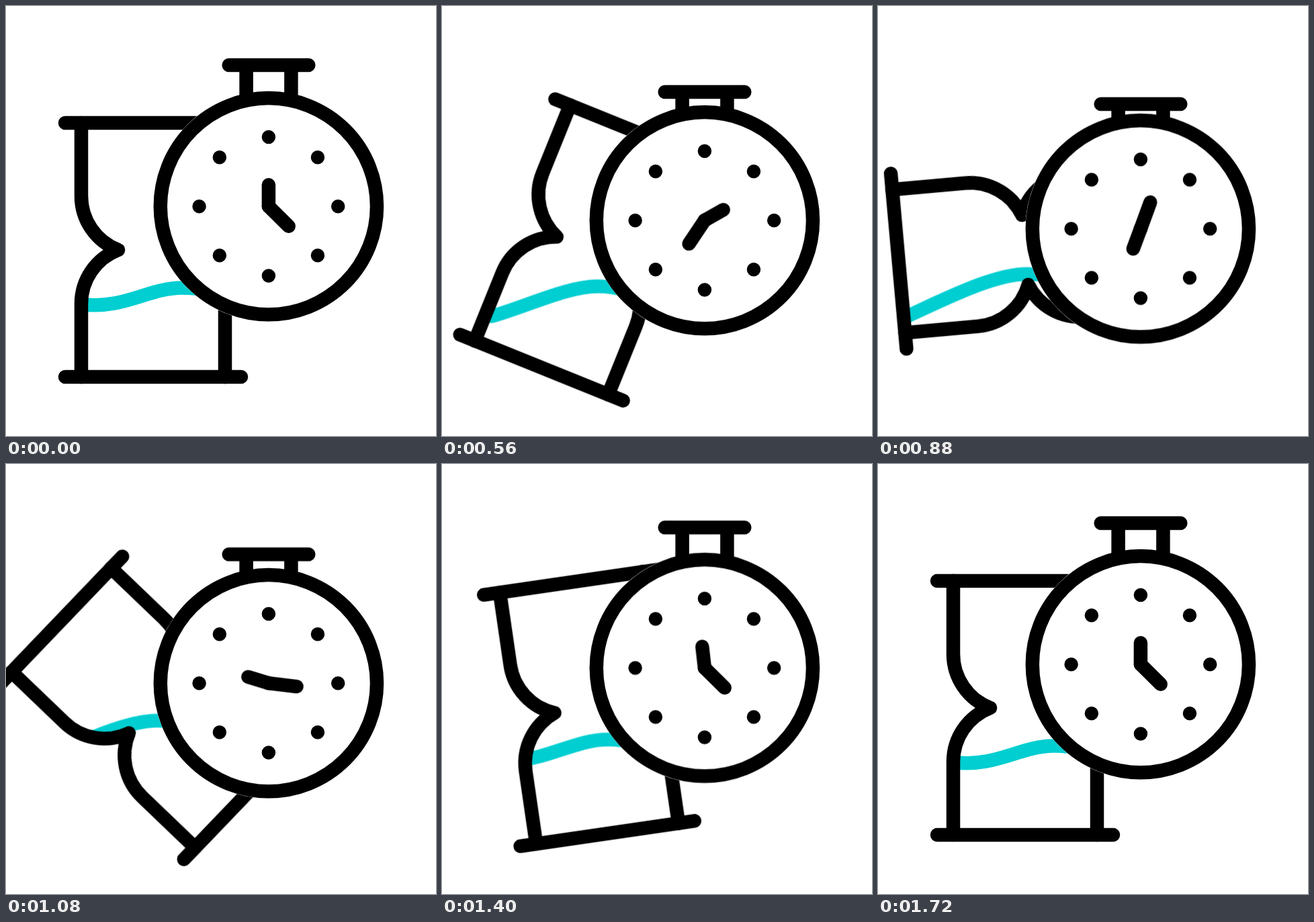
Write an HTML page that moves like this. It is 640 by 640 pixels and loops after 2000 ms.

```html
<!DOCTYPE html>
<html lang="en">
<head>
<meta charset="utf-8">
<title>Hourglass and stopwatch</title>
<style>
  html, body { margin: 0; width: 100%; height: 100%; overflow: hidden; background: #fff; }
  svg {
    display: block; width: 100%; height: 100%;
    fill: none; stroke: #000; stroke-width: 20.5; stroke-linecap: round; stroke-linejoin: round;
  }

  .spin, .level, .rise, .wave, .dial, .crown, .hour, .minute {
    animation: 2s cubic-bezier(.5, 0, .5, 1) infinite;
  }

  /* hourglass half turn; the liquid is turned back to stay level */
  .spin, .level { transform-origin: 219px 363px; animation-timing-function: cubic-bezier(.593, 0, .407, 1); }
  .spin { animation-name: spin; }
  .level { animation-name: level; }
  @keyframes spin { 0%, 4% { transform: rotate(0deg); } 86%, 100% { transform: rotate(180deg); } }
  @keyframes level { 0%, 4% { transform: rotate(0deg); } 86%, 100% { transform: rotate(-180deg); } }

  .rise { animation-name: rise; animation-timing-function: linear; }
  @keyframes rise {
    0%, 4% { transform: translateY(0); }
    18% { transform: translateY(-.5px); animation-timing-function: cubic-bezier(.5, .05, .75, .3); }
    36% { transform: translateY(-8.5px); }
    44% { transform: translateY(-20.5px); animation-timing-function: cubic-bezier(.4, .4, .7, 1); }
    54% { transform: translateY(-37.5px); animation-timing-function: cubic-bezier(.45, 0, .7, .6); }
    70% { transform: translateY(-9.5px); animation-timing-function: cubic-bezier(.3, .75, .6, 1); }
    82%, 100% { transform: translateY(0); }
  }

  .wave { animation-name: wave; animation-timing-function: linear; }
  @keyframes wave {
    0%, 4% {
      d: path("M112 444 C175 452 212 419.5 262 419.5 S335 440 362 447");
      animation-timing-function: cubic-bezier(.4, 0, .7, .5);
    }
    18% { d: path("M105 449.5 C150 447.5 205 419.5 248 419.5 S321 440 348 447"); }
    36% {
      d: path("M50 475.5 C110 449.5 172 419.5 219 419.5 S292 440 319 447");
      animation-timing-function: cubic-bezier(.3, .45, .6, 1);
    }
    44% { d: path("M30 488.5 C95 459.5 170 419.5 222 419.5 S295 440 322 447"); }
    54% {
      d: path("M30 488.5 C95 459.5 173 419.5 225 419.5 S298 440 325 447");
      animation-timing-function: cubic-bezier(.45, 0, .7, .6);
    }
    70% {
      d: path("M110 450.5 C160 447.5 200 419.5 247 419.5 S320 440 347 447");
      animation-timing-function: cubic-bezier(.3, .75, .6, 1);
    }
    82%, 100% { d: path("M112 444 C175 452 212 419.5 262 419.5 S335 440 362 447"); }
  }

  .dial { animation-name: dial; }
  @keyframes dial {
    0%, 10% { transform: translateY(0); }
    42% { transform: translateY(33.4px); }
    82%, 100% { transform: translateY(0); }
  }

  .crown { animation-name: crown; }
  @keyframes crown {
    0%, 9% { transform: translateY(0); }
    41% { transform: translateY(58.4px); }
    80%, 100% { transform: translateY(0); }
  }

  .hour, .minute { transform-origin: 390.9px 298.2px; }
  .hour { animation-name: hour; }
  .minute { animation-name: minute; }
  @keyframes hour { 0%, 6% { transform: rotate(0deg); } 78%, 100% { transform: rotate(360deg); } }
  @keyframes minute { 0%, 6% { transform: rotate(0deg); } 70%, 100% { transform: rotate(360deg); } }
</style>
</head>
<body>
<svg viewBox="0 0 640 640">
  <defs>
    <path id="side" d="M112 174 V283 A85.7 85.7 0 0 0 167 363 A85.7 85.7 0 0 0 112 443 V552"/>
    <clipPath id="inside">
      <path d="M112 174 V283 A85.7 85.7 0 0 0 167 363 A85.7 85.7 0 0 0 112 443 V552
               H326 V443 A85.7 85.7 0 0 0 271 363 A85.7 85.7 0 0 0 326 283 V174 Z"/>
    </clipPath>
  </defs>

  <g class="spin">
    <g clip-path="url(#inside)">
      <g class="level">
        <g class="rise">
          <path class="wave" stroke="#00ced1" d="M112 444 C175 452 212 419.5 262 419.5 S335 440 362 447"/>
        </g>
      </g>
    </g>
    <use href="#side"/>
    <use href="#side" transform="matrix(-1 0 0 1 438 0)"/>
    <path d="M88 174 H350 M88 552 H350"/>
  </g>

  <circle class="dial" cx="390.9" cy="298.2" r="171.6" fill="#fff" stroke="none"/>
  <g class="crown">
    <path d="M331.7 88 H450.3"/>
    <path d="M357.6 88 V138 M424.4 88 V138" stroke-linecap="butt"/>
  </g>
  <g class="dial">
    <circle cx="390.9" cy="298.2" r="161.1" fill="#fff"/>
    <circle cx="390.9" cy="298.2" r="103.3" pathLength="8" stroke-dasharray="0 1"/>
    <path class="hour" d="M390.9 298.2 V266.2"/>
    <path class="minute" d="M390.9 298.2 L420.7 327.7"/>
  </g>
</svg>
</body>
</html>
```
